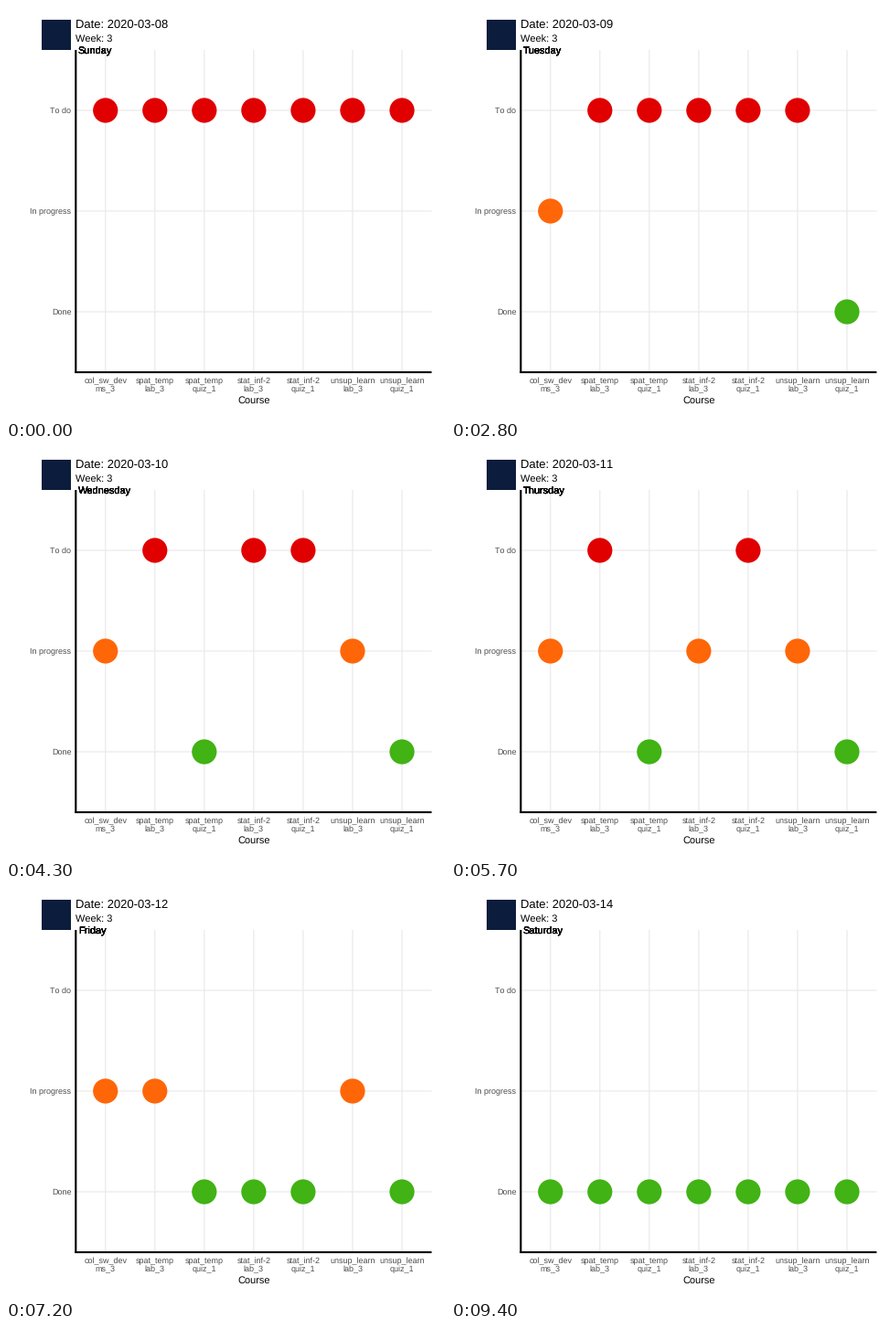
Write a matplotlib script that moves like this. It is 480 by 450 pixels and loops after 10 s.

```python
import matplotlib.pyplot as plt
import numpy as np
from matplotlib.animation import FuncAnimation
from matplotlib.patches import Circle, Rectangle

plt.rcParams["font.family"] = "Liberation Sans"
plt.rcParams["text.hinting"] = "none"
plt.rcParams["text.hinting_factor"] = 1

WIDTH, HEIGHT, DPI = 480, 450, 72  # at 72 dpi one point is one pixel
LEFT, RIGHT, TOP, BOTTOM = 76.3, 465.4, 48, 400
STEP_X = (RIGHT - LEFT) / 7.2
STEP_Y = (BOTTOM - TOP) / 3.2

STATUSES = ["To do", "In progress", "Done"]
COLORS = ["#e00000", "#ff6608", "#41b314"]
TASKS = ["col_sw_dev\nms_3", "spat_temp\nlab_3", "spat_temp\nquiz_1",
         "stat_inf-2\nlab_3", "stat_inf-2\nquiz_1",
         "unsup_learn\nlab_3", "unsup_learn\nquiz_1"]
DAYS = ["Sunday", "Monday", "Tuesday", "Wednesday",
        "Thursday", "Friday", "Saturday"]
# One digit per task: index into STATUSES.
BOARD = ["0000000", "1000002", "1020012", "1021012",
         "1122212", "1222222", "2222222"]

# Tick at which each day's label, dots and date appear.
DAY_STARTS = [0, 13, 28, 43, 57, 72, 87]
DOT_STARTS = [0, 20, 35, 50, 64, 79, 94]
DATE_STARTS = [0, 21, 36, 51, 65, 80, 94]

task_x = LEFT + STEP_X * (0.6 + np.arange(7))
status_y = TOP + STEP_Y * (0.6 + np.arange(3))

fig = plt.figure(figsize=(WIDTH / DPI, HEIGHT / DPI), dpi=DPI, facecolor="white")
ax = fig.add_axes([0, 0, 1, 1])
ax.set_xlim(0, WIDTH)
ax.set_ylim(HEIGHT, 0)
ax.axis("off")


def line(xs, ys, color, width, z):
    ax.plot(xs, ys, color=color, lw=width, solid_capstyle="butt",
            snap=False, zorder=z)


def label(x, y, text, size, color="black", ha="left"):
    return ax.text(x, y, text, fontsize=size, color=color, ha=ha,
                   va="baseline", zorder=5)


for x in task_x:
    line([x, x], [TOP, BOTTOM], "#ebebeb", 1.3, 1)
for y in status_y:
    line([LEFT, RIGHT], [y, y], "#ebebeb", 1.3, 1)
line([LEFT, LEFT], [TOP, BOTTOM + 1], "black", 2.13, 4)
line([LEFT - 1, RIGHT], [BOTTOM, BOTTOM], "black", 2.13, 4)

for y, status in zip(status_y, STATUSES):
    label(71.3, y + 3.2, status, 8.8, "#4d4d4d", "right")
for x, task in zip(task_x, TASKS):
    for row, part in enumerate(task.split("\n")):
        label(x, 412 + 9.5 * row, part, 8.8, "#4d4d4d", "center")
label((LEFT + RIGHT) / 2, 434, "Course", 11, ha="center")
label(LEFT, 40, "Week: 3", 11)
ax.add_patch(Rectangle((38.5, 15), 32.5, 32.5, color="#0c1c3c", lw=0))

date_text = label(LEFT, 24, "", 13.2)
# Every task stamps the day once, so the overlapping copies look heavier.
day_texts = [label(78.7, 53, "", 11) for _ in TASKS]
dots = [ax.add_patch(Circle((x, status_y[0]), 13.6, lw=0, zorder=3))
        for x in task_x]


def current(starts, tick):
    return int(np.searchsorted(starts, tick, side="right")) - 1


def update(tick):
    date_text.set_text(f"Date: 2020-03-{8 + current(DATE_STARTS, tick):02d}")
    for text in day_texts:
        text.set_text(DAYS[current(DAY_STARTS, tick)])
    for dot, x, digit in zip(dots, task_x, BOARD[current(DOT_STARTS, tick)]):
        status = int(digit)
        dot.center = (x, status_y[status])
        dot.set_facecolor(COLORS[status])
    return [date_text, *day_texts, *dots]


animation = FuncAnimation(fig, update, frames=100, interval=100,
                          init_func=lambda: update(0), repeat=True,
                          repeat_delay=0, blit=False)
plt.show()
```
